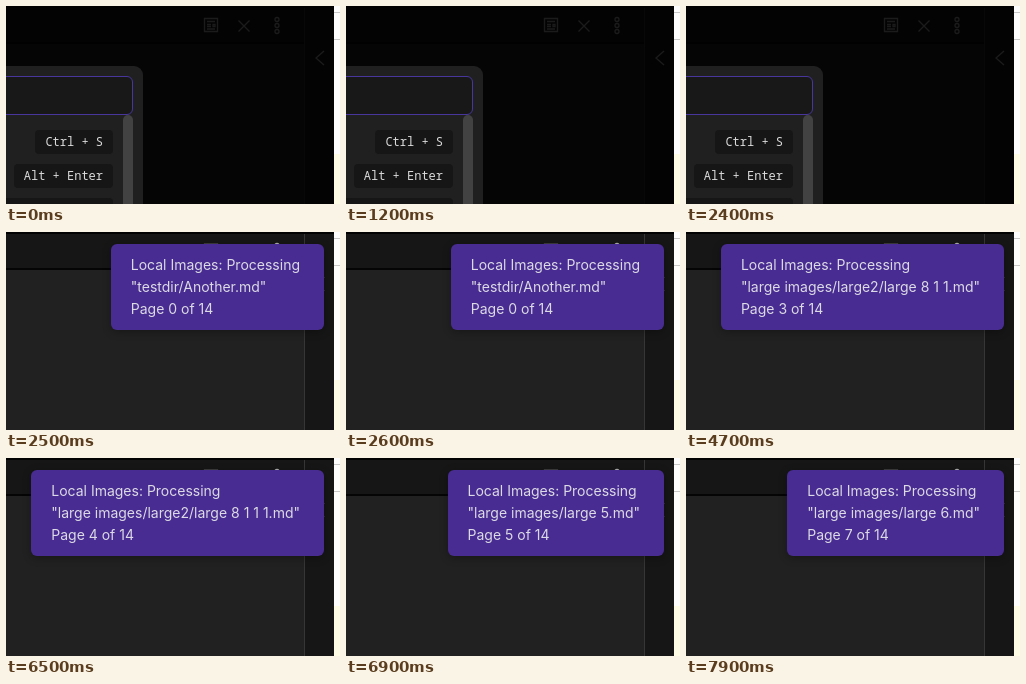
Write an HTML page that moves like this. It is 334 by 198 pixels and loops after 8 s.

```html
<!DOCTYPE html>
<html lang="en">
<head>
<meta charset="utf-8">
<title>Processing notices</title>
<style>
html, body { margin: 0; width: 100%; height: 100%; overflow: hidden; background: #020202; }
#stage { position: relative; width: 334px; height: 198px; overflow: hidden; background: #020202; }
#stage div, #stage svg { position: absolute; box-sizing: border-box; }
#app { left: 0; top: 2px; width: 328px; height: 196px; overflow: hidden; background: #212121; }
.header { left: 0; top: 0; width: 298px; height: 36px; background: #161616; border-bottom: 2px solid #050505; }
.sidebar { left: 298px; top: 0; width: 30px; height: 196px; background: #161616; border-left: 1px solid #363636; }
.icons { left: 0; top: 0; fill: none; stroke: #b3b3b3; stroke-width: 1.3; }
#dim { inset: 0; background: rgba(0, 0, 0, .85); }
.modal { left: -20px; top: 58px; width: 157px; height: 160px; border-radius: 9px; background: #202020; }
.input { left: -10px; top: 10px; width: 157px; height: 39px; border: 1px solid #48369c; border-radius: 6px; background: #181818; }
.thumb { left: 137px; top: 49px; width: 10px; height: 130px; border-radius: 5px; background: #424242; }
#stage .key { right: 30px; height: 24px; padding: 0 10px; border-radius: 4px; background: #161616; color: #dadada;
  font: 12px/24px "Noto Sans Mono", monospace; white-space: pre; }
.outside { left: 328px; top: 0; width: 6px; height: 198px; background: #fefefe; }
.outside div { left: 0; width: 6px; }
.rule { height: 1px; background: #c9c9c9; }
.note { top: 148px; height: 50px; background: #fffde6; }
#notice { right: 16px; top: 12px; height: 86px; padding: 10px 24px 10px 20px; border-radius: 6px;
  background: #482c92; color: #dcdae4; box-shadow: 0 2px 8px rgba(0, 0, 0, .3);
  font: 14px/22px Inter, sans-serif; white-space: pre; }
</style>
</head>
<body>
<div id="stage">
  <div id="app">
    <div class="header"></div>
    <div class="sidebar"></div>
    <svg class="icons" width="328" height="196" viewBox="0 2 328 196">
      <path d="M198.5 12.5h13v13h-13zM201 15.5h8M201 18.5h4M201 20.5h4M201 23h8M207 18.5h2v2h-2z"/>
      <path d="M232.5 14.5l11 11M243.5 14.5l-11 11M318 45l-8 7 8 7"/>
      <circle cx="271" cy="13.5" r="2"/>
      <circle cx="271" cy="19.5" r="2"/>
      <circle cx="271" cy="25.5" r="2"/>
    </svg>
    <div id="dim">
      <div class="modal">
        <div class="input"></div>
        <div class="thumb"></div>
        <div class="key" style="top:64px">Ctrl + S</div>
        <div class="key" style="top:98px">Alt + Enter</div>
        <div class="key" style="top:132px;width:115px"></div>
      </div>
    </div>
  </div>
  <div class="outside">
    <div class="rule" style="top:6px"></div>
    <div class="rule" style="top:33px"></div>
    <div class="note"></div>
  </div>
  <div id="notice"></div>
</div>
<script>
const LOOP = 8000;
const dim = document.getElementById("dim");
const notice = document.getElementById("notice");

// Start time in ms and the file being processed; the index is the page.
const pages = [
  [2500, "testdir/Another"],
  [3000, "large images/large2/large 8"],
  [3850, "large images/large2/large 8 1"],
  [4650, "large images/large2/large 8 1 1"],
  [5600, "large images/large2/large 8 1 1 1"],
  [6600, "large images/large 5"],
  [7100, "large images/large 1"],
  [7500, "large images/large 6"]
];
let shown;

function draw(now) {
  const t = now % LOOP;
  const page = pages.filter(([start]) => start <= t).length - 1;
  if (page !== shown) {
    shown = page;
    const open = page < 0;
    dim.style.display = open ? "block" : "none";
    notice.style.display = open ? "none" : "block";
    if (!open) {
      notice.textContent = `Local Images: Processing\n"${pages[page][1]}.md"\nPage ${page} of 14`;
    }
  }
  requestAnimationFrame(() => draw(performance.now() - begin));
}
const begin = performance.now();
draw(0);
</script>
</body>
</html>
```
